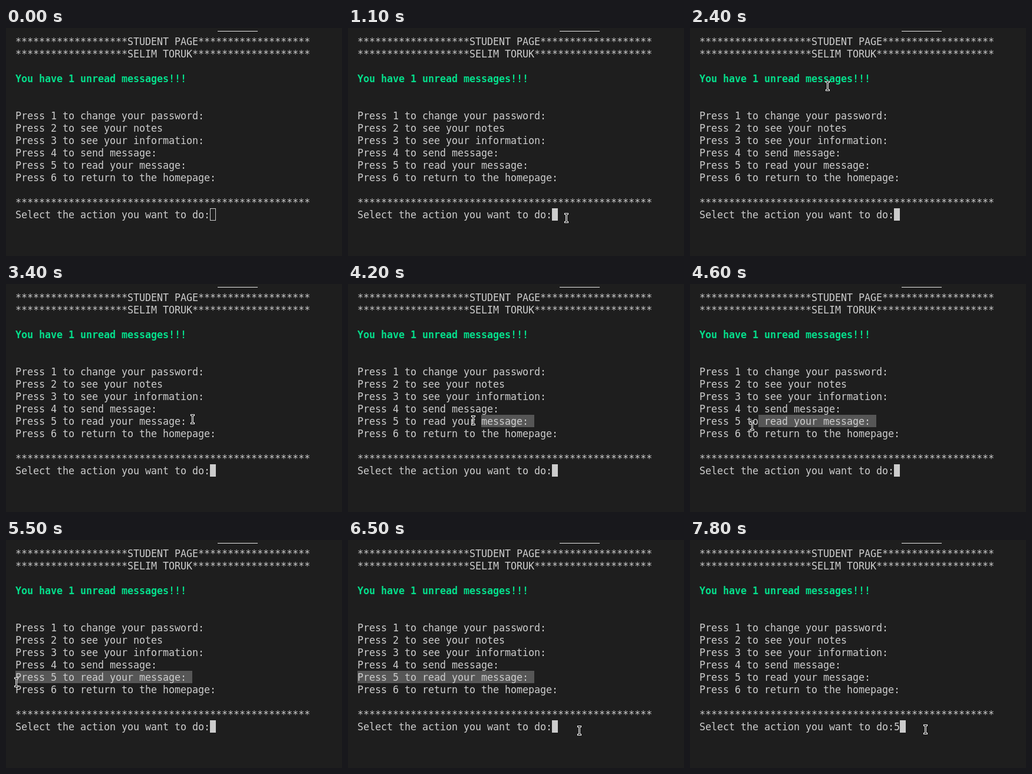
Write an HTML page with a canvas that moves like this. It is 570 by 387 pixels and loops after 8000 ms.

```html
<!DOCTYPE html>
<html lang="en">
<head>
<meta charset="utf-8">
<title>Student page terminal</title>
<style>
  html, body { margin: 0; width: 100%; height: 100%; overflow: hidden; background: #1e1e1e; }
  canvas { display: block; }
</style>
</head>
<body>
<canvas id="stage" width="570" height="387"></canvas>
<script>
const canvas = document.getElementById('stage');
const ctx = canvas.getContext('2d');
const LOOP = 8000, STEP = 100;
const LEFT = 16, TOP = 12, CELL_W = 10, CELL_H = 21;
const SHOWN = 200, FOCUS = 900, DRAG_START = 3900, DRAG_END = 5450, CLEAR = 6600, TYPED = 7800;
const ANCHOR = { row: 10, col: 30 };
const LAG = 50;

const stars = n => '*'.repeat(n);
const lines = `${stars(19)}STUDENT PAGE${stars(19)}
${stars(19)}SELIM TORUK${stars(20)}

You have 1 unread messages!!!


Press 1 to change your password:
Press 2 to see your notes
Press 3 to see your information:
Press 4 to send message:
Press 5 to read your message:
Press 6 to return to the homepage:

${stars(50)}
Select the action you want to do:`.split('\n');
const HEADING = 3, PROMPT = lines.length - 1;

// Each move glides from wherever the mouse rests; power 1 is steady, 3 slows down
const glide = (start, end, x, y, power = 3) => ({ start, end, x, y, power });
const moves = [
  glide(200, 1100, 370, 323),
  glide(1100, 1300, 376, 348),
  glide(1600, 2400, 233, 99),
  glide(2400, 3700, 317, 232),
  glide(3800, 4200, 212, 232, 1),
  glide(4200, 4450, 145, 245, 1),
  glide(4450, 4900, 24, 234, 1),
  glide(5200, 5600, 15, 245, 1),
  glide(5800, 6100, 200, 367, 1),
  glide(6100, 6700, 399, 322)
];

function mouseAt(t) {
  let x = 48, y = 300;
  for (const m of moves) {
    const k = Math.min(1, Math.max(0, (t - m.start) / (m.end - m.start)));
    const eased = 1 - (1 - k) ** m.power;
    x += (m.x - x) * eased;
    y += (m.y - y) * eased;
  }
  return { x, y };
}

const cellX = col => LEFT + col * CELL_W;
const cellY = row => TOP + row * CELL_H;

function drawLine(text, row) {
  const bold = row === HEADING;
  ctx.font = `${bold ? 'bold ' : ''}16.8px "DejaVu Sans Mono", monospace`;
  ctx.fillStyle = bold ? '#05de8b' : '#cccccc';
  [...text].forEach((ch, col) => ctx.fillText(ch, cellX(col), cellY(row) + 17));
}

function drawSelection(t) {
  if (t < DRAG_START || t >= CLEAR) return;
  const { x, y } = mouseAt(Math.min(t - LAG, DRAG_END));
  const col = Math.max(0, Math.round((x - LEFT) / CELL_W));
  const from = cellX(ANCHOR.col), top = cellY(ANCHOR.row);
  ctx.fillStyle = '#565656';
  if (y < top + CELL_H) {
    ctx.fillRect(cellX(col), top, from - cellX(col), CELL_H);
  } else {
    ctx.fillRect(from, top, canvas.width - from, CELL_H);
    ctx.fillRect(LEFT, top + CELL_H, col * CELL_W, CELL_H);
  }
}

function drawCaret(t, col) {
  const x = cellX(col), y = cellY(PROMPT);
  ctx.fillStyle = ctx.strokeStyle = '#cccccc';
  ctx.lineWidth = 1;
  if (t < FOCUS) ctx.strokeRect(x + 0.5, y + 0.5, CELL_W - 1, CELL_H - 1);
  else ctx.fillRect(x, y, CELL_W, CELL_H);
}

const beam = new Path2D('M-2 -7.5H2M0 -7.5V6.5M-2 6.5H2');

function drawMouse(t) {
  if (t < SHOWN) return;
  const { x, y } = mouseAt(t);
  ctx.save();
  ctx.translate(Math.round(x) + 0.5, Math.round(y));
  ctx.lineCap = 'square';
  for (const [color, width] of [['#ffffff', 3], ['#000000', 1]]) {
    ctx.strokeStyle = color;
    ctx.lineWidth = width;
    ctx.stroke(beam);
  }
  ctx.restore();
}

function frame() {
  const t = Math.floor(performance.now() % LOOP / STEP) * STEP;
  ctx.fillStyle = '#1e1e1e';
  ctx.fillRect(0, 0, canvas.width, canvas.height);
  ctx.fillStyle = '#e7e7e7';
  ctx.fillRect(359, 5, 68, 1);
  drawSelection(t);
  const prompt = lines[PROMPT] + (t >= TYPED ? '5' : '');
  lines.forEach((text, row) => drawLine(row === PROMPT ? prompt : text, row));
  drawCaret(t, prompt.length);
  drawMouse(t);
  requestAnimationFrame(frame);
}
frame();
</script>
</body>
</html>
```
